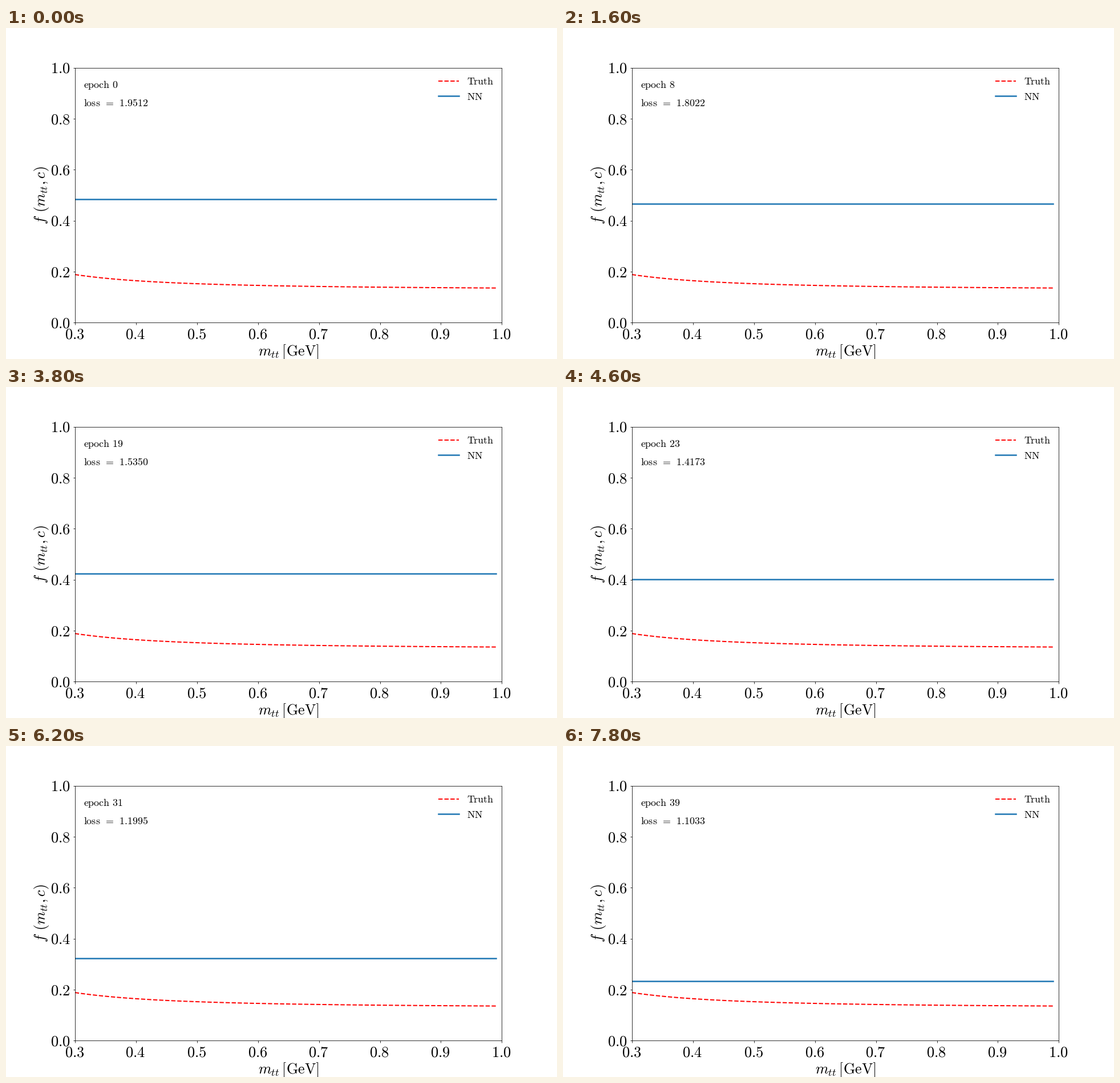
Recreate the animation shown at these times as a matplotlib script. Size 966 by 580 pixels, loop 8 s.

```python
import numpy as np
import matplotlib.pyplot as plt
from matplotlib.animation import FuncAnimation

W, H, DPI = 966, 580, 72
LEFT, RIGHT, TOP, BOTTOM = 0.125 * W, 0.9 * W, 0.12 * H, 0.89 * H
EPOCHS, STEP_MS = 40, 200
SMALL, LARGE, TICK = 18, 26, 26.5
BLUE, RED = "#1f77b4", "red"
GAP = r"\hspace{0.38}"

plt.rcParams["mathtext.fontset"] = "cm"


def spline(t, xs, ys):
    """Cubic Hermite curve through the points (xs, ys)."""
    xs, ys = np.asarray(xs, float), np.asarray(ys, float)
    slopes = np.gradient(ys, xs, edge_order=2)
    i = np.clip(np.searchsorted(xs, t, side="right") - 1, 0, len(xs) - 2)
    h = xs[i + 1] - xs[i]
    u = (t - xs[i]) / h
    return ((1 + 2 * u) * (1 - u) ** 2 * ys[i]
            + u * (1 - u) ** 2 * h * slopes[i]
            + u ** 2 * (3 - 2 * u) * ys[i + 1]
            + u ** 2 * (u - 1) * h * slopes[i + 1])


epochs = np.arange(EPOCHS)
line_y = spline(epochs,
                [0, 8, 13, 18, 24, 27, 30, 31, 36, 39],
                [300, 307.7, 315.8, 324.4, 340.8, 353.3,
                 366.4, 371.6, 396.4, 412.2])
level = (BOTTOM - line_y) / (BOTTOM - TOP)
loss = spline(epochs,
              [0, 8, 13, 19, 27, 31, 39],
              [1.9512, 1.8022, 1.6852, 1.5350, 1.3002, 1.1995, 1.1033])

fig = plt.figure(figsize=((W + 0.001) / DPI, (H + 0.001) / DPI), dpi=DPI,
                 facecolor="white")
ax = fig.add_axes([0.125, 0.11, 0.775, 0.77])
ax.set(xlim=(0.3, 1.0), ylim=(0, 1),
       xticks=np.linspace(0.3, 1.0, 8), yticks=np.linspace(0, 1, 6))
ax.tick_params(labelbottom=False, labelleft=False)

# Overlay in pixel coordinates, y pointing down
page = fig.add_axes([0, 0, 1, 1])
page.set(xlim=(0, W), ylim=(H, 0))
page.axis("off")


def label(x, y, tex, size=SMALL, **kw):
    kw.setdefault("ha", "left")
    return page.text(x, y, f"${tex}$", size=size, color="black",
                     va="baseline", **kw)


def roman(text):
    return r"\mathrm{" + text + "}"


for v in np.linspace(0.3, 1.0, 8):
    x = LEFT + (v - 0.3) / 0.7 * (RIGHT - LEFT)
    label(x - 0.7, 544, roman(f"{v:.1f}"), TICK, ha="center")
for v in np.linspace(0, 1, 6):
    y = BOTTOM - v * (BOTTOM - TOP)
    label(113, y + 9.3, roman(f"{v:.1f}"), TICK, ha="right")

label(495, 574, r"m_{tt}\hspace{0.19}" + roman("[GeV]"), LARGE, ha="center")
label(69, 292.9, "f" + GAP + "(m_{tt},c)", LARGE, ha="center",
      rotation=90, rotation_mode="anchor")

mass = np.linspace(0.3, 0.99, 70)
truth_style = dict(color=RED, lw=2, ls="--")
net_style = dict(color=BLUE, lw=2.5)
ax.plot(mass, 0.1287 + 0.00685 * mass ** -1.8, **truth_style)
net, = ax.plot([0.3, 0.99], [level[0]] * 2, **net_style)

# Legend
page.plot([757.8, 793.8], [93.2, 93.2], **truth_style)
page.plot([757.8, 793.8], [119.2, 119.2], **net_style)
label(808.2, 99.3, roman(r"T\hspace{-0.095}ruth"))
label(808.2, 125.6, roman("NN"))

epoch_text = label(135.7, 105.4, "0")
loss_text = label(135.7, 136.5, "0")


def update(i):
    net.set_ydata([level[i]] * 2)
    epoch_text.set_text("$" + roman("epoch" + GAP + str(i)) + "$")
    loss_text.set_text("$" + roman("loss") + r"\hspace{0.43}=\hspace{0.43}"
                       + roman(f"{loss[i]:.4f}") + "$")
    return net, epoch_text, loss_text


anim = FuncAnimation(fig, update, frames=EPOCHS, interval=STEP_MS,
                     repeat=True, repeat_delay=0, blit=False)
plt.show()
```
